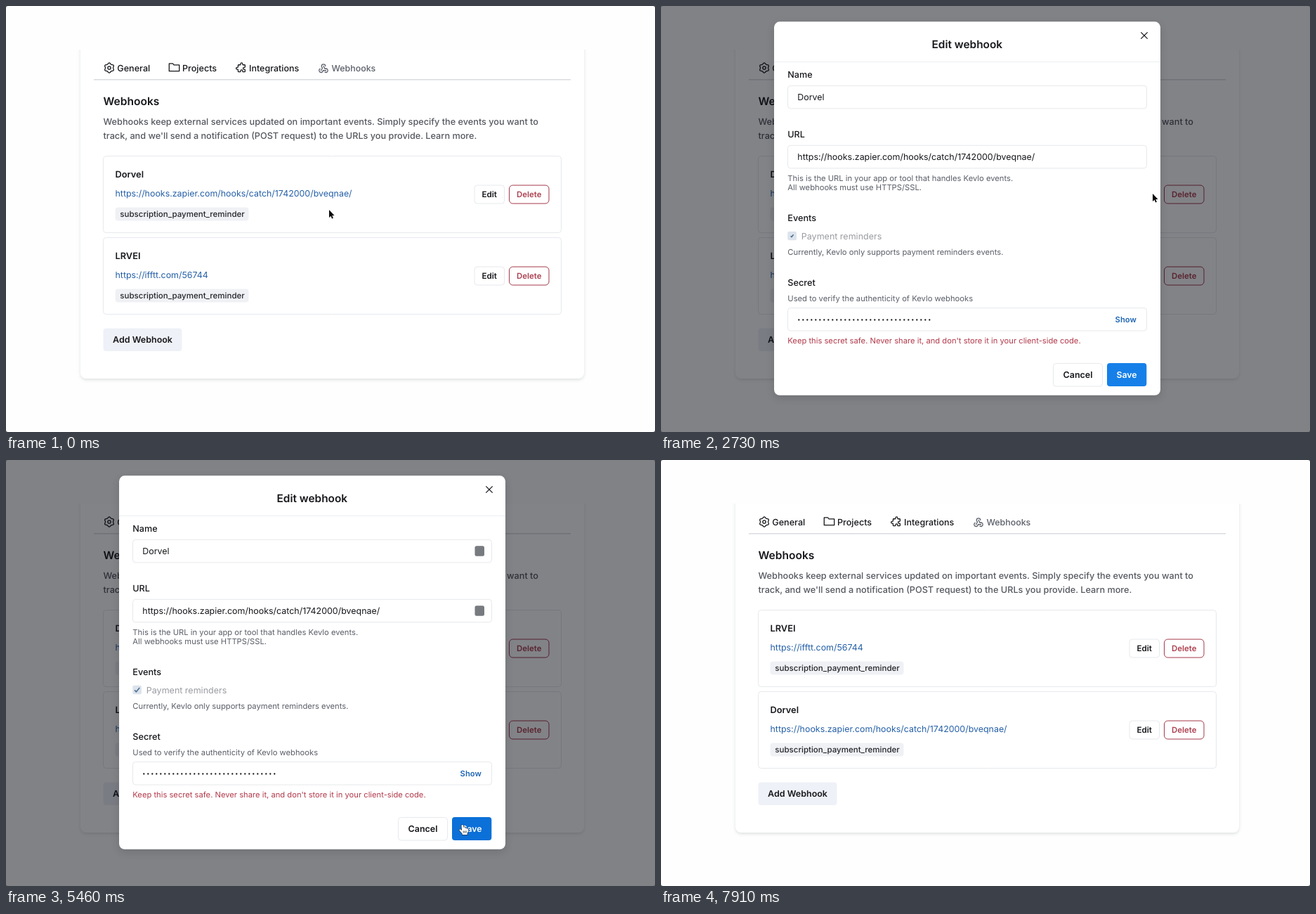
Write an HTML page with a canvas that moves like this. It is 924 px wide and 606 px high and loops after 8120 ms.

```html
<!DOCTYPE html>
<html lang="en">
<head>
<meta charset="utf-8">
<title>Webhook settings</title>
<style>
html, body { margin: 0; width: 100%; height: 100%; overflow: hidden; background: #555; }
canvas { display: block; width: 924px; height: 606px; border-radius: 3px; }
</style>
</head>
<body>
<canvas id="stage" width="924" height="606"></canvas>
<script>
const W = 924, H = 606, LOOP = 8120, STEP = 70;
const view = document.getElementById('stage').getContext('2d');
const layer = document.createElement('canvas');
layer.width = W;
layer.height = H;
const sheet = layer.getContext('2d');
let c = view;

const INK = '#17181c', LINE = '#e7e9ed', BLUE = '#2560a8', RED = '#a5394a';
const HOOKS = [
  { name: 'Dorvel', url: 'https://hooks.zapier.com/hooks/catch/1742000/bveqnae/' },
  { name: 'LRVEI', url: 'https://ifftt.com/56744' }
];

const clamp = v => Math.max(0, Math.min(1, v));
const ease = v => v * v * (3 - 2 * v);

function text(s, x, y, size, weight = 400, color = INK, align = 'left') {
  c.font = `${weight} ${size}px Inter, "Liberation Sans", sans-serif`;
  c.textAlign = align;
  c.fillStyle = color;
  c.fillText(s, x, y);
}

function box(x, y, w, h, r, fill, stroke) {
  c.beginPath();
  c.roundRect(x, y, w, h, r);
  if (fill) { c.fillStyle = fill; c.fill(); }
  if (stroke) { c.strokeStyle = stroke; c.lineWidth = 1; c.stroke(); }
}

function line(color, width, ...pts) {
  c.beginPath();
  pts.forEach(([x, y]) => c.lineTo(x, y));
  c.strokeStyle = color;
  c.lineWidth = width;
  c.stroke();
}

function shadow(color, blur, dy) {
  c.shadowColor = color;
  c.shadowBlur = blur;
  c.shadowOffsetY = dy;
}

// icons, drawn in a 24 unit box
const FOLDER = new Path2D('M3 18.5V5H9.5L11.5 7.5H21V18.5Z');
const PUZZLE = new Path2D('M11 4a2 2 0 114 0v1a1 1 0 001 1h3a1 1 0 011 1v3a1 1 0 01-1 1h-1a2 2 0 100 4h1a1 1 0 011 1v3a1 1 0 01-1 1h-3a1 1 0 01-1-1v-1a2 2 0 10-4 0v1a1 1 0 01-1 1H7a1 1 0 01-1-1v-3a1 1 0 00-1-1H4a2 2 0 110-4h1a1 1 0 001-1V7a1 1 0 011-1h3a1 1 0 001-1V4z');
const HOOK = new Path2D('M4.9 13.6A4 4 0 1 0 11 17h6M15 20.5A4 4 0 1 0 17 13c-.7 0-1.4.2-2 .5L12 8M16 8a4 4 0 1 0-8 0c0 1.5.8 2.8 2 3.5L7 17');
const GEAR = new Path2D();
for (let i = 0; i <= 72; i++) {
  const a = i / 72 * Math.PI * 2, r = 8.7 + 1.1 * Math.cos(6 * a + Math.PI);
  GEAR.lineTo(12 + r * Math.cos(a), 12 + r * Math.sin(a));
}
GEAR.closePath();
GEAR.moveTo(15, 12);
GEAR.arc(12, 12, 3, 0, Math.PI * 2);

const ARROW = new Path2D('M0 0V11L2.5 8.8L4.1 12.5L5.9 11.7L4.3 8H7.5Z');
const HAND = new Path2D('M-1.6 1.2C-1.6-.5.8-.5 1 1.2L1.4 4.6C2-.1 3.7 3.8 3.8 5C4.6 3.9 5.9 4.3 6 5.7C7 4.9 8.1 5.5 8 6.9V9.4L6.7 12V14H-.4V12.4L-4.4 8C-5.2 6.7-3.6 5.6-2.4 6.7L-1 8Z');

function icon(path, x, y, k, color) {
  c.save();
  c.translate(x, y);
  c.scale(k, k);
  c.translate(-12, -12);
  c.lineJoin = c.lineCap = 'round';
  c.lineWidth = 1.3 / k;
  c.strokeStyle = color;
  c.stroke(path);
  c.restore();
}

function hookCard(hook, y, editFill) {
  box(138.5, y, 652, 109, 4, '#fff', LINE);
  text(hook.name, 155.5, y + 30, 12.8, 600);
  text(hook.url, 155.5, y + 57.6, 12.42, 400, BLUE);
  box(155.5, y + 73, 190, 19, 4, '#eff1f5');
  text('subscription_payment_reminder', 162.3, y + 86.5, 11.54, 500, '#24262b');
  box(667, y + 41.5, 42.5, 26, 4, editFill, LINE);
  text('Edit', 688.2, y + 58.9, 11.6, 600, INK, 'center');
  box(716.5, y + 41.5, 56.5, 26, 5, '#fff', RED);
  text('Delete', 744.7, y + 58.9, 11.4, 600, '#ac4050', 'center');
}

function page(t) {
  const loading = t >= 6840 && t < 7420;
  const grow = loading ? 46 : 0;
  c.fillStyle = '#fefefe';
  c.fillRect(0, 0, W, H);
  c.save();
  c.beginPath();
  c.rect(0, 62, W, H);
  c.clip();
  shadow('rgba(70,90,85,.17)', 4, 2);
  box(106, 52, 717, 478 + grow, 8, '#fff');
  c.restore();

  icon(GEAR, 147, 88, .72, INK);
  icon(FOLDER, 239.5, 87.5, .8, INK);
  icon(PUZZLE, 334.7, 88, .71, INK);
  icon(HOOK, 452, 88.3, .69, '#5b5f69');
  text('General', 158.3, 92.5, 12.6, 500);
  text('Projects', 251, 92.5, 12.6, 500);
  text('Integrations', 346, 92.5, 12.5, 500);
  text('Webhooks', 463.5, 92.5, 12.4, 500, '#5b5f69');
  line('#d9dbe0', 1.5, [125, 104.8], [804, 104.8]);

  text('Webhooks', 138.5, 141, 15.55, 600);
  text('Webhooks keep external services updated on important events. Simply specify the events you want to', 138.5, 169.4, 12.7, 500, '#55585f');
  text("track, and we'll send a notification (POST request) to the URLs you provide. Learn more.", 138.5, 189, 12.7, 500, '#55585f');

  const list = t >= 7420 ? [HOOKS[1], HOOKS[0]] : HOOKS;
  const hover = t >= 1680 && t < 2800;
  hookCard(list[0], 213.5, hover ? (t >= 2240 ? '#e4e8ee' : '#eef1f5') : '#fff');
  hookCard(list[1], 329.5, '#fff');

  if (loading) {
    const a = t / 500 * Math.PI;
    c.beginPath();
    c.arc(464.5, 470, 16, a, a + 4.6);
    c.strokeStyle = '#cfd5df';
    c.lineWidth = 2.5;
    c.stroke();
  }
  box(138.5, 458.5 + grow, 112, 32.5, 4, '#eff1f8');
  text('Add Webhook', 194.5, 479.3 + grow, 12.5, 600, INK, 'center');
}

function modal(t, hoverSave) {
  const filled = t >= 2730, hint = '#9aa3b0', note = '#5a5e67';
  const tools = t >= 3430;
  const field = (y, value, empty) => {
    box(180.5, y, 511, 32.5, 4, '#fff', '#e6e8ec');
    text(filled ? value : empty, 194.3, y + 21, 12.45, 400, filled ? INK : hint);
    if (tools) box(667.5, y + 9, 13.5, 14.5, 2.5, '#777a7e');
  };
  c.clearRect(0, 0, W, H);
  c.save();
  shadow('rgba(0,0,0,.13)', 12, 4);
  box(161, 22.3, 550, 531.5, 8, '#fff');
  c.restore();
  line('#eceef1', 1, [161, 79.5], [711, 79.5]);
  text('Edit webhook', 435.8, 60, 15.4, 600, INK, 'center');
  line(INK, 1.3, [683.3, 37.4], [692.7, 46.6]);
  line(INK, 1.3, [692.7, 37.4], [683.3, 46.6]);

  text('Name', 180.3, 101.6, 12.6, 500);
  field(113.3, HOOKS[0].name, 'e.g. ' + HOOKS[0].name);
  text('URL', 180.3, 186.8, 12.6, 500);
  field(198.3, HOOKS[0].url, 'https://example.com/webhook');
  text('This is the URL in your app or tool that handles Kevlo events.', 180.3, 248.6, 11.22, 400, note);
  text('All webhooks must use HTTPS/SSL.', 180.3, 262.3, 11.22, 400, note);

  text('Events', 180.3, 305.5, 12.7, 500);
  box(180.3, 320.7, 12.6, 12.6, 2, '#dce3ec');
  const tick = .55 + .45 * clamp((t - 2870) / 70);
  if (filled) {
    const p = (x, y) => [186.6 + x * tick, 327 + y * tick];
    line('#4e7191', 1.6, p(-3.5, .4), p(-1.2, 2.8), p(3.6, -3));
  }
  text('Payment reminders', 199.8, 331.6, 12.5, 400, '#9a9ca2');
  text('Currently, Kevlo only supports payment reminders events.', 180.3, 354.4, 11.22, 400, note);

  text('Secret', 180.3, 397.6, 12.7, 500);
  text('Used to verify the authenticity of Kevlo webhooks', 180.3, 420, 11.22, 400, note);
  box(180.5, 429.5, 511, 32.5, 4, '#fff', '#e6e8ec');
  if (filled) {
    c.fillStyle = INK;
    for (let i = 0; i < 32; i++) {
      c.beginPath();
      c.arc(196.3 + i * 6.0, 446.5, 1.15, 0, Math.PI * 2);
      c.fill();
    }
  }
  text('Show', 661.7, 449.7, 11.2, 600, '#1f66b5', 'center');
  text("Keep this secret safe. Never share it, and don't store it in your client-side code.", 180.3, 479.5, 11.2, 400, '#b23a4b');

  box(558.5, 508.5, 70, 32.5, 4, '#fff', LINE);
  text('Cancel', 593.5, 529.2, 12.5, 600, INK, 'center');
  const press = t >= 5740 && t < 5880;
  box(635, 508, 56.3, 33, 4, press ? '#0a61c0' : hoverSave ? '#0b70d8' : filled ? '#1680e8' : '#62acf2');
  text('Save', 663, 529.2, 12.3, 600, '#fff', 'center');
}

// pointer stops: time, x, y
const STOPS = [
  [0, 460, 290], [70, 460, 290], [840, 235, 281], [1330, 331, 275],
  [1680, 700, 267], [3290, 700, 267], [3640, 490, 350], [3780, 490, 350],
  [4200, 475, 285], [4760, 643, 520], [5040, 643, 520], [5460, 650, 519],
  [5950, 650, 519], [6790, 609, 540], [7000, 609, 540], [7910, 575, 622], [LOOP, 575, 622]
];

function pointerAt(t) {
  const i = STOPS.findIndex(s => s[0] > t);
  const [t0, x0, y0] = STOPS[i - 1], [t1, x1, y1] = STOPS[i];
  const k = ease((t - t0) / (t1 - t0));
  return [x0 + (x1 - x0) * k, y0 + (y1 - y0) * k];
}

function pointer(t, x, y) {
  const hand = (t >= 1680 && t < 2450) || t >= 4690;
  c.save();
  c.translate(x, y);
  c.lineJoin = 'round';
  const path = hand ? HAND : ARROW;
  c.lineWidth = hand ? 1.1 : 1.6;
  c.strokeStyle = hand ? '#111' : '#fff';
  c.fillStyle = hand ? '#fff' : '#0a0a0a';
  c.stroke(path);
  c.fill(path);
  if (hand) {
    for (const px of [1.2, 3.2, 5.2]) line('#111', .7, [px, 8.5], [px, 11.5]);
  }
  c.restore();
}

function draw(t) {
  const [x, y] = pointerAt(t);
  c = view;
  page(t);

  const leave = clamp((t - 6840) / 300);
  const opening = t < 6840;
  const shown = opening ? clamp((t - 2430) / 300) : 1 - Math.pow(leave, 1.4);
  if (shown > 0) {
    c.fillStyle = `rgba(6,9,16,${.5 * shown})`;
    c.fillRect(0, 0, W, H);
    const glow = .6 * shown * (1 - shown);
    box(106, 52, 717, t >= 6840 && t < 7420 ? 524 : 478, 8, `rgba(255,255,255,${glow})`);

    c = sheet;
    modal(t, x > 635 && x < 691 && y > 508 && y < 541);
    c = view;
    const size = opening ? .95 + .05 * shown : 1 - .05 * clamp(leave / .3);
    c.save();
    c.globalAlpha = opening ? Math.pow(shown, 1.15) : shown;
    c.translate(436, 288);
    c.scale(size, size);
    c.drawImage(layer, -436, -288);
    c.restore();
  }
  pointer(t, x, y);
}

let start = null;
function frame(now) {
  if (start === null) start = now;
  const t = (now - start) % LOOP;
  draw(Math.floor(t / STEP) * STEP);
  requestAnimationFrame(frame);
}
view.textRendering = sheet.textRendering = 'geometricPrecision';
draw(0);
requestAnimationFrame(frame);
</script>
</body>
</html>
```
